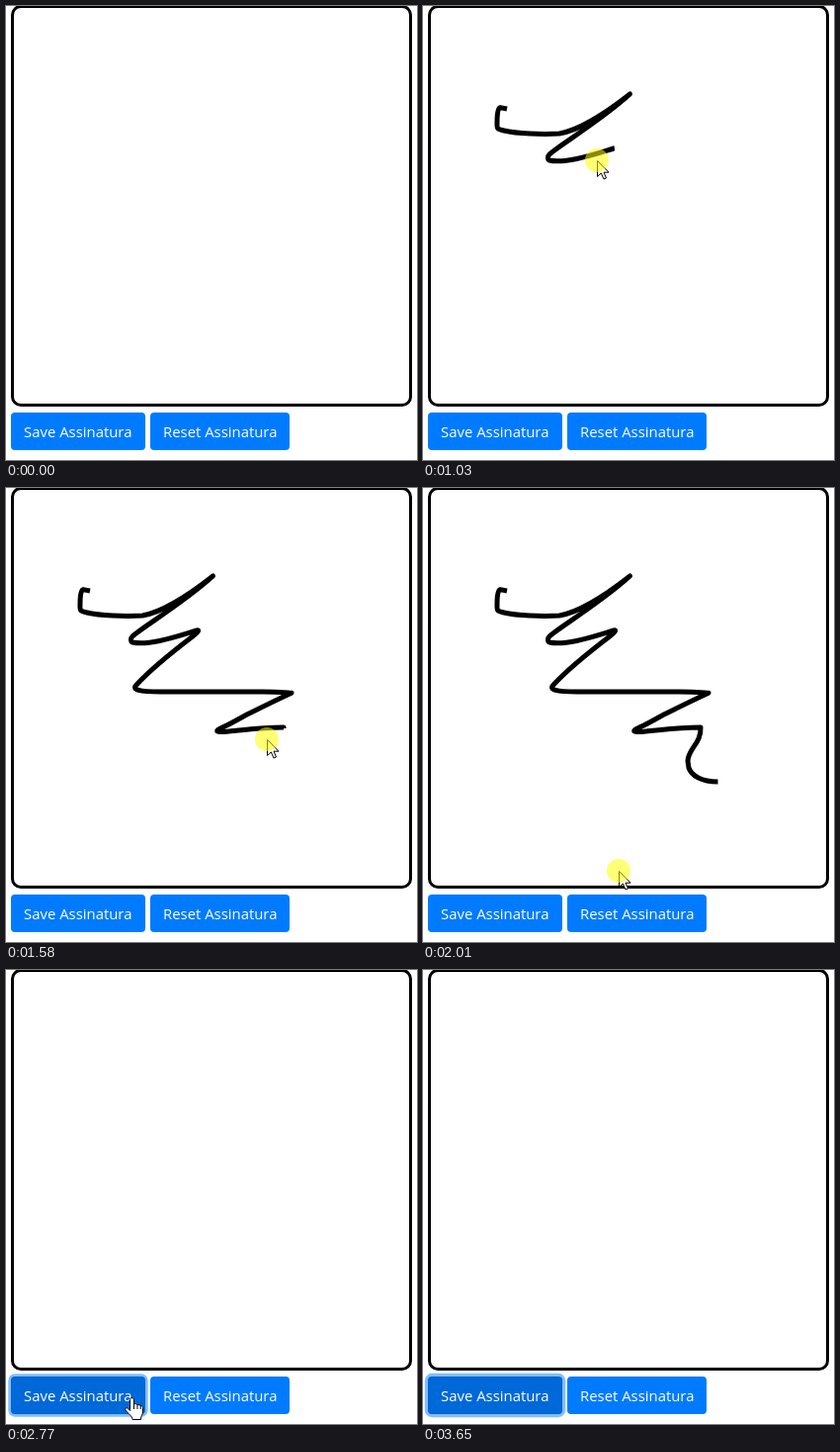
Recreate the animation shown at these times as an HTML page with a canvas. Size 416 by 459 pixels, loop 3760 ms.

```html
<!DOCTYPE html>
<html lang="pt">
<head>
<meta charset="utf-8">
<title>Assinatura</title>
<style>
html, body { margin: 0; width: 100%; height: 100%; overflow: hidden; background: #fff; }
canvas { display: block; width: 416px; height: 459px; }
</style>
</head>
<body>
<canvas id="stage"></canvas>
<script>
const W = 416, H = 459, LOOP = 3760;
const START = 163, STEP = 108.3; // the screen refreshes in even steps
const canvas = document.getElementById('stage');
const ctx = canvas.getContext('2d');
const dpr = window.devicePixelRatio || 1;
canvas.width = W * dpr;
canvas.height = H * dpr;

// Legs of the pen line, each drawn at its own even speed
const legs = [
  { steps: 1, d: 'M85 104L78 102.6' },
  { steps: 4, d: 'C75.5 103 75 111 75 117C75 124 74 124 82 126C95 129 120 130 138 129' +
    'C160 125 184 109 209.5 89C180 116 136 142 128 150C126 152 126 155 128 156C145 160 176 149 193 144' },
  { steps: 5, d: 'C197 143 193 147 189 150C168 166 144 186 132 199C127 204 135 206 156 206L260 206' +
    'C275 206 285 207 289 207.2C272 215 260 221 246 228C236 233 225 240 217 243' +
    'C211 246 214 247 220 246.5C240 245 255 242 281 242' },
  { steps: 2, d: 'C282 258 268 264 268 276L269 283C272 291 282 297 298.5 297' }
];
const line = document.createElementNS('http://www.w3.org/2000/svg', 'path');
let d = '', length = 0;
for (const leg of legs) {
  d += leg.d;
  line.setAttribute('d', d);
  leg.from = length;
  length = leg.to = line.getTotalLength();
}
const ink = new Path2D(d);

const arrow = new Path2D('M.5 .5V16.5L4.3 13L7 19L9.5 18L7 12.2H12Z');
const hand = new Path2D(
  'M-.5 3.5C-.5 1 3.5 1 3.5 3.5V8.5C4 7.2 7 7.2 7 9C7.8 8 10 8.4 10.2 10' +
  'C11.4 9 12.5 10 12.5 11.5V16C12.5 18.5 10.5 19.5 10.5 23.5H2C2 20-3 17-5 14' +
  'C-6 12-3.6 11-2.4 12.5L-.5 14.5Z');
const knuckles = new Path2D('M3.5 8.5V13M7 9V13M10.2 10V13');

const clamp = u => Math.min(1, Math.max(0, u));

// Point on a cubic curve a-b-c-d
function curve(u, ...pts) {
  const v = 1 - u;
  const weights = [v * v * v, 3 * v * v * u, 3 * v * u * u, u * u * u];
  return [0, 1].map(i => pts.reduce((sum, p, n) => sum + p[i] * weights[n], 0));
}

function inkLength(step) {
  let left = step - 3, sum = 0;
  for (const { steps, from, to } of legs) {
    sum += (to - from) * clamp(left / steps);
    left -= steps;
  }
  return sum;
}

// Approach, follow the pen, then leave for the button
function pointerAt(step) {
  if (step <= 4) return curve(step / 4, [168, 230], [115, 150], [65, 85], [57, 130]);
  if (step <= 15) {
    const tip = line.getPointAtLength(inkLength(step));
    return [tip.x - 17, tip.y + 12];
  }
  const u = 1 - (1 - clamp((step - 15) / 5)) ** 1.5;
  return curve(u, [282, 309], [262, 340], [150, 431], [126, 431]);
}

function box(x, y, w, h, r) {
  ctx.beginPath();
  ctx.roundRect(x, y, w, h, r);
}

function button(x, w, label, hover, ring) {
  if (ring) {
    ctx.fillStyle = '#80bdff';
    box(x - ring, 411 - ring, w + 2 * ring, 38 + 2 * ring, 4 + ring);
    ctx.fill();
  }
  ctx.fillStyle = hover ? '#0062cc' : '#007bff';
  box(x, 411, w, 38, 4);
  ctx.fill();
  ctx.fillStyle = hover ? '#0069d9' : '#007bff';
  box(x + 1, 412, w - 2, 36, 3);
  ctx.fill();
  ctx.fillStyle = '#fff';
  ctx.font = '14.9px "Open Sans", "Noto Sans", sans-serif';
  ctx.fillText(label, x + 13, 436);
}

function pointer([x, y], isHand, alpha, glow) {
  const shape = isHand ? hand : arrow;
  ctx.save();
  ctx.translate(Math.round(x), Math.round(y));
  ctx.globalAlpha = alpha;
  ctx.lineWidth = 1;
  ctx.lineJoin = 'round';
  ctx.fillStyle = '#fff';
  ctx.fill(shape);
  ctx.stroke(shape);
  if (isHand) ctx.stroke(knuckles);
  if (glow) {
    ctx.fillStyle = 'rgba(255,255,0,.54)';
    ctx.beginPath();
    ctx.arc(0, 0, 12, 0, 2 * Math.PI);
    ctx.fill();
  }
  ctx.restore();
}

function draw(t) {
  const step = Math.floor((t - START) / STEP);
  ctx.setTransform(dpr, 0, 0, dpr, 0, 0);
  ctx.fillStyle = '#fff';
  ctx.fillRect(0, 0, W, H);

  ctx.strokeStyle = '#000';
  ctx.lineWidth = 3;
  box(6.5, 0.5, 403, 403, 8.5);
  ctx.stroke();

  if (step >= 4 && step < 24) {
    ctx.lineWidth = 5;
    ctx.lineJoin = 'round';
    ctx.setLineDash([inkLength(step), 2 * length]);
    ctx.stroke(ink);
    ctx.setLineDash([]);
  }

  const ring = step < 23 ? 0 : t < 3650 ? 2.7 : 3.2;
  button(5, 136, 'Save Assinatura', step >= 20, ring);
  button(146, 141, 'Reset Assinatura', false, 0);

  if (step >= 0 && step < 27) {
    pointer(pointerAt(step), step >= 19, step < 26 ? 1 : 0.5, step < 23);
  }
}

function tick() {
  draw(performance.now() % LOOP);
  requestAnimationFrame(tick);
}
tick();
</script>
</body>
</html>
```
